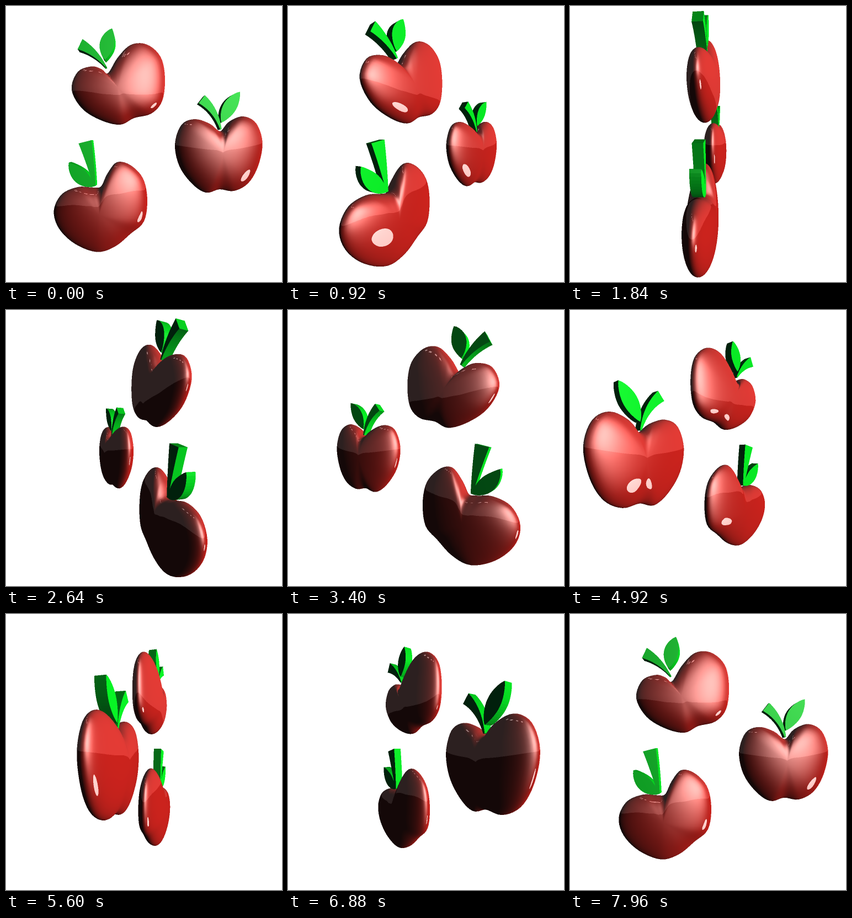
Animation of 500 by 500 pixels, one loop 8 s. Source, as an HTML page with a canvas:

```html
<!DOCTYPE html>
<html lang="en">
<head>
<meta charset="utf-8">
<title>Turning apples</title>
<style>
html, body { margin: 0; width: 100%; height: 100%; overflow: hidden; background: #fff; }
canvas { display: block; width: 500px; height: 500px; }
</style>
</head>
<body>
<canvas id="stage" width="1000" height="1000"></canvas>
<script>
const LOOP = 8000, STEP = 40, MID = 250, EYE = 490;
const SS = 2, SIZE = 500 * SS;
const THICK = 25, LEAF_DEPTH = 8;
const APPLE = 1, LEAF = 2;

// Each fruit: centre, outline running clockwise from the cleft, then stem and
// leaf as quadratic centre lines (base, control, tip) with a half width.
const fruits = [
  { centre: [386, 268],
    outline: [388,227, 405,209, 430,200, 453,213, 464,248, 456,290, 438,321, 412,335,
              386,332, 362,338, 337,322, 314,290, 306,250, 318,215, 342,205, 368,213],
    stem: [387,224, 379,190, 353,170, 9], leaf: [388,212, 402,182, 421,157, 12] },
  { centre: [205, 153],
    outline: [185,123, 202,95, 226,71, 255,70, 280,92, 288,130, 283,172, 263,195,
              232,203, 207,215, 172,207, 138,186, 119,152, 130,120, 155,110, 173,115],
    stem: [181,111, 163,85, 136,72, 10], leaf: [180,100, 182,70, 193,44, 13] },
  { centre: [173, 372],
    outline: [172,327, 184,303, 201,283, 225,288, 248,312, 256,350, 250,390, 226,412,
              198,435, 165,445, 125,430, 96,402, 87,370, 101,341, 130,328, 156,329],
    stem: [162,325, 155,285, 145,246, 12], leaf: [163,325, 134,312, 116,283, 13] }
];

const verts = [];   // [x, y, z, nx, ny, nz], origin on the turning axis
const tris = [];    // [a, b, c, kind]

function addVert(p, n) {
  return verts.push([...p, ...n]) - 1;
}

function addQuad(a, b, c, d, kind) {
  tris.push([a, b, c, kind], [a, c, d, kind]);
}

function unit(v, fallback) {
  const len = Math.hypot(...v);
  return len > 1e-6 ? v.map(q => q / len) : fallback;
}

const sub = (a, b) => a.map((q, i) => q - b[i]);
const cross = (a, b) => [a[1] * b[2] - a[2] * b[1], a[2] * b[0] - a[0] * b[2], a[0] * b[1] - a[1] * b[0]];

// Closed Catmull-Rom curve through the outline points.
function smooth(flat, per) {
  const n = flat.length / 2, out = [];
  const at = (i, k) => flat[((i + n) % n) * 2 + k];
  for (let i = 0; i < n; i++)
    for (let j = 0; j < per; j++) {
      const t = j / per;
      out.push([0, 1].map(k => {
        const a = at(i - 1, k), b = at(i, k), c = at(i + 1, k), d = at(i + 2, k);
        return b + t / 2 * (c - a + t * (2 * a - 5 * b + 4 * c - d + t * (3 * (b - c) + d - a)));
      }));
    }
  return out;
}

// Inflate an outline into a pillow: sections get rounder towards the middle.
function addBody({ centre, outline }) {
  const ring = smooth(outline, 5).map(p => sub(p, centre));
  const n = ring.length, rows = 30;
  const mean = ring.reduce((sum, q) => sum + Math.hypot(...q), 0) / n;
  const point = (row, i) => {
    const a = Math.PI * row / rows, s = Math.sin(a);
    const [x, y] = ring[(i + n) % n], r = Math.hypot(x, y);
    const k = s * (mean + (r - mean) * (.5 + .5 * s)) / r;
    return [centre[0] - MID + x * k, centre[1] - MID + y * k, THICK * Math.cos(a)];
  };
  const first = verts.length;
  for (let row = 0; row <= rows; row++)
    for (let i = 0; i < n; i++) {
      const da = sub(point(row + .5, i), point(row - .5, i));
      const dp = sub(point(row, i + 1), point(row, i - 1));
      const pole = row % rows === 0;
      const end = [0, 0, row ? -1 : 1];
      addVert(point(row, i), pole ? end : unit(cross(da, dp), end));
    }
  for (let row = 0; row < rows; row++)
    for (let i = 0; i < n; i++) {
      const a = first + row * n, j = (i + 1) % n;
      addQuad(a + i, a + j, a + n + j, a + n + i, APPLE);
    }
}

// Extruded ribbon along a quadratic curve.
function addRibbon([x0, y0, cx, cy, x1, y1, w], width) {
  const count = 16, left = [], right = [], side = [];
  for (let i = 0; i <= count; i++) {
    const u = i / count, v = 1 - u;
    const x = v * v * x0 + 2 * u * v * cx + u * u * x1 - MID;
    const y = v * v * y0 + 2 * u * v * cy + u * u * y1 - MID;
    const [tx, ty] = unit([v * (cx - x0) + u * (x1 - cx), v * (cy - y0) + u * (y1 - cy)]);
    const h = w * width(u);
    left.push([x + ty * h, y - tx * h]);
    right.push([x - ty * h, y + tx * h]);
    side.push([tx, ty]);
  }
  const D = LEAF_DEPTH;
  const face = (pts, n) => addQuad(...pts.map(p => addVert(p, n)), LEAF);
  const wall = (p, q, n) => face([[...p, D], [...q, D], [...q, -D], [...p, -D]], n);
  const normal = (p, q, sign) => {
    const [dx, dy] = unit(sub(q, p), [0, 1]);
    return [dy * sign, -dx * sign, 0];
  };
  for (let i = 0; i < count; i++) {
    const a = left[i], b = left[i + 1], c = right[i + 1], d = right[i];
    for (const z of [1, -1]) face([a, b, c, d].map(p => [...p, z * D]), [0, 0, z]);
    wall(a, b, normal(a, b, 1));
    wall(d, c, normal(d, c, -1));
  }
  wall(left[count], right[count], [...side[count], 0]);
  wall(left[0], right[0], [-side[0][0], -side[0][1], 0]);
}

for (const f of fruits) {
  addBody(f);
  addRibbon(f.stem, u => .15 + .85 * u);
  addRibbon(f.leaf, u => Math.max(0, Math.sin(Math.PI * u)) ** .8);
}

const ctx = document.getElementById('stage').getContext('2d');
const image = ctx.createImageData(SIZE, SIZE);
const pixels = image.data;
const depth = new Float32Array(SIZE * SIZE);
const kinds = new Uint8Array(SIZE * SIZE);
const normals = new Float32Array(SIZE * SIZE * 3);

function project(v, c, s) {
  const x = v[0] * c + v[2] * s, z = v[2] * c - v[0] * s;
  const k = EYE / (EYE - z);
  return [(MID + x * k) * SS, (MID + v[1] * k) * SS, k, v[3] * c + v[5] * s, v[4], v[5] * c - v[3] * s];
}

function fillTriangle(a, b, c, kind) {
  const area = (b[0] - a[0]) * (c[1] - a[1]) - (b[1] - a[1]) * (c[0] - a[0]);
  if (Math.abs(area) < 1e-6) return;
  const xMin = Math.max(0, Math.ceil(Math.min(a[0], b[0], c[0]) - .5));
  const xMax = Math.min(SIZE - 1, Math.floor(Math.max(a[0], b[0], c[0]) - .5));
  const yMin = Math.max(0, Math.ceil(Math.min(a[1], b[1], c[1]) - .5));
  const yMax = Math.min(SIZE - 1, Math.floor(Math.max(a[1], b[1], c[1]) - .5));
  for (let y = yMin; y <= yMax; y++)
    for (let x = xMin; x <= xMax; x++) {
      const px = x + .5 - a[0], py = y + .5 - a[1];
      const v = (px * (c[1] - a[1]) - py * (c[0] - a[0])) / area;
      const w = (py * (b[0] - a[0]) - px * (b[1] - a[1])) / area;
      const u = 1 - v - w;
      if (u < -1e-4 || v < -1e-4 || w < -1e-4) continue;
      const i = y * SIZE + x, k = u * a[2] + v * b[2] + w * c[2];
      if (k <= depth[i]) continue;
      depth[i] = k;
      kinds[i] = kind;
      for (let m = 0; m < 3; m++) normals[i * 3 + m] = u * a[3 + m] + v * b[3 + m] + w * c[3 + m];
    }
}

const bell = (x, mid, spread) => Math.exp(-(((x - mid) / spread) ** 2) / 2);

function shade(i) {
  let nx = normals[i * 3], ny = normals[i * 3 + 1], nz = normals[i * 3 + 2];
  const nl = Math.sqrt(nx * nx + ny * ny + nz * nz) || 1;
  nx /= nl; ny /= nl; nz /= nl;
  let vx = MID - (i % SIZE) / SS, vy = MID - Math.floor(i / SIZE) / SS, vz = EYE;
  const vl = Math.sqrt(vx * vx + vy * vy + vz * vz);
  vx /= vl; vy /= vl; vz /= vl;
  const facing = 2 * (nx * vx + ny * vy + nz * vz);
  const rx = facing * nx - vx, ry = facing * ny - vy, rz = facing * nz - vz;
  const turn = Math.atan2(rx, rz), rise = Math.asin(Math.max(-1, Math.min(1, -ry)));

  // Side lamp, soft front panel, and a sky with a hard horizon.
  const lamp = Math.max(0, (nx * .89 - ny * .12 + nz * .42 + .25) / 1.25);
  const base = .07 + .9 * lamp;
  const panel = bell(turn, .4, .43) * bell(rise, .32, .46);
  const p = i * 4;
  if (kinds[i] === LEAF) {
    pixels[p] = 8 * base + 70 * panel;
    pixels[p + 1] = 15 + 240 * base + 85 * panel;
    pixels[p + 2] = 10 + 28 * base + 65 * panel;
    return;
  }
  let extra = rise > .03 ? 30 : 6;
  if (turn < -.2 && turn > -2 && Math.abs(rise - 1) < .04 && Math.cos(turn * 14) > .3) extra += 100;
  if (rx * .77 + ry * .49 + rz * .41 > .986) extra += 170;
  pixels[p] = 205 * base + 135 * panel + extra;
  pixels[p + 1] = 30 * base + 145 * panel + extra;
  pixels[p + 2] = 24 * base + 142 * panel + extra;
}

function draw(time) {
  const angle = 2 * Math.PI * time / LOOP, c = Math.cos(angle), s = Math.sin(angle);
  pixels.fill(255);
  depth.fill(0);
  const pts = verts.map(v => project(v, c, s));
  for (const [a, b, d, kind] of tris) fillTriangle(pts[a], pts[b], pts[d], kind);
  for (let i = 0; i < depth.length; i++) if (depth[i]) shade(i);
  ctx.putImageData(image, 0, 0);
}

let shown = -1;
const start = performance.now();
function tick() {
  const time = Math.floor((performance.now() - start) % LOOP / STEP) * STEP;
  if (time !== shown) draw(shown = time);
  requestAnimationFrame(tick);
}
tick();
</script>
</body>
</html>
```
